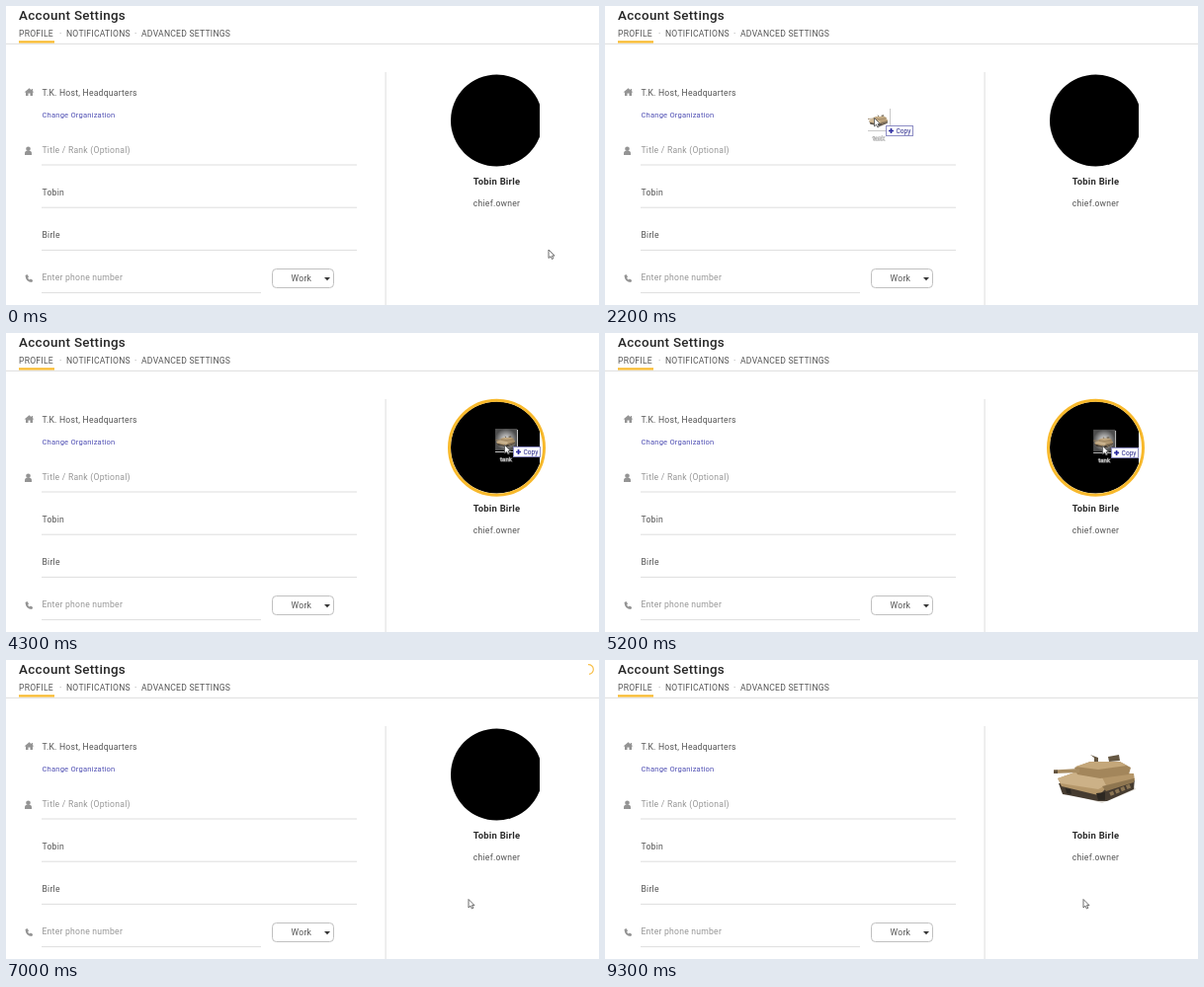
Recreate the animation shown at these times as an HTML page. Size 600 px wide and 303 px high, loop 9400 ms.

```html
<!DOCTYPE html>
<html lang="en">
<head>
<meta charset="utf-8">
<title>Account Settings</title>
<style>
  html, body { margin: 0; width: 100%; height: 100%; overflow: hidden; background: #fff; }
  svg { display: block; width: 100%; height: 100%; }
  text { font: 8.6px Roboto, sans-serif; letter-spacing: .24px; fill: #545454; }
  .title { font-size: 13.4px; font-weight: 500; letter-spacing: .33px; fill: #262626; }
  .tab { fill: #555; }
  .link { font-size: 7.6px; letter-spacing: .18px; fill: #5050b4; }
  .hint { fill: #969696; }
  .center { text-anchor: middle; }
  .name { font-size: 9.4px; font-weight: 600; fill: #2a2a2a; }
  .copy { font-size: 6.6px; letter-spacing: 0; fill: #26268a; }
  .file { font-size: 6px; letter-spacing: .08px; fill: #fff; stroke: #8a8a8a; stroke-width: 1px; paint-order: stroke; opacity: .85; }
  .icon { fill: #949494; }
  .rule { stroke: #dedede; fill: none; }
</style>
</head>
<body>
<svg viewBox="0 0 600 303">
  <defs>
    <clipPath id="photoEdge"><rect x="450" y="69" width="90" height="94"/></clipPath>
    <radialGradient id="thumb">
      <stop offset=".3" stop-color="#fff" stop-opacity=".75"/>
      <stop offset="1" stop-color="#fff" stop-opacity=".3"/>
    </radialGradient>
    <g id="tank">
      <path d="M8 38L50 50 84 36 80 31 20 29Z" fill="#ddd9d2"/>
      <path d="M6 30L10 41 16 42 46 48 55 48 82 36 83 25 50 30Z" fill="#453b30"/>
      <path d="M5 25L22 19 82 20 83 27 54 35 50 39 46 42 9 33Z" fill="#b5976a"/>
      <path d="M5 25L22 19 50 24 54 32 46 36 8 30Z" fill="#ccb187"/>
      <path d="M50 33L82 25 82 29 54 38Z" fill="#8f7650"/>
      <path d="M22 14L38 8 68 8 79 14 77 21 48 25 25 21Z" fill="#a3865b"/>
      <path d="M23 13L38 8 68 8 75 12 46 16Z" fill="#c4a77a"/>
      <path d="M1 16.5L27 15 27 19 1 20Z" fill="#a88d63"/>
      <path d="M1 16.5H5V20H1Z" fill="#62533f"/>
      <path d="M38 1L46 4 46 8 42 8 42 4ZM56 3L67 1 68 7 57 8Z" fill="#655742"/>
      <path d="M13 35L18 36 19 41 14 40ZM44 40L53 39 53 47 46 47Z" fill="#2d2822"/>
      <path d="M58 41L80 32" stroke="#8b7553" stroke-width="4" stroke-dasharray="4 2" fill="none"/>
    </g>
  </defs>
  <rect width="600" height="303" fill="#fff"/>

  <text class="title" x="13" y="14">Account Settings</text>
  <text class="tab" x="13" y="30.5">PROFILE</text>
  <text class="tab hint" x="54" y="30.5">·</text>
  <text class="tab" x="61" y="30.5">NOTIFICATIONS</text>
  <text class="tab hint" x="130" y="30.5">·</text>
  <text class="tab" x="137" y="30.5">ADVANCED SETTINGS</text>
  <path class="rule" d="M0 38.4H600"/>
  <rect x="13" y="35.3" width="36" height="2.2" fill="#f8b92c"/>

  <path class="icon" d="M23.5 83.2L25.8 85.2V84H27V86.3L28.5 87.6H27V91H24.5V88.5H22.5V91H20V87.6H18.5Z"/>
  <path class="icon" d="M19 151V149.5Q19 146.8 21.3 146.8H23.7Q26 146.8 26 149.5V151Z"/>
  <circle class="icon" cx="22.5" cy="144.7" r="2.3"/>
  <path class="icon" d="M19.5 273L21.5 272 23 274.5 22 275.8 23.8 277.6 25 276.5 27.2 278 26.2 280Q20 280 19.5 273Z"/>

  <text x="36.5" y="90.5">T.K. Host, Headquarters</text>
  <text class="link" x="36.5" y="113.2">Change Organization</text>
  <text class="hint" x="36.5" y="149">Title / Rank (Optional)</text>
  <text x="36.5" y="192">Tobin</text>
  <text x="36.5" y="235">Birle</text>
  <text class="hint" x="36.5" y="278">Enter phone number</text>
  <path class="rule" d="M36 161H355M36 204.2H355M36 247.4H355M36 290.6H258M384.1 67V303"/>
  <rect x="269.5" y="266.5" width="62" height="19" rx="4" fill="#fff" stroke="#c0c0c0"/>
  <text x="288.5" y="279">Work</text>
  <path d="M322 275H328L325 278.2Z" fill="#333"/>

  <circle id="badge" cx="496.5" cy="116" r="46.5" clip-path="url(#photoEdge)"/>
  <circle id="ring" cx="496.5" cy="116.2" r="48" fill="none" stroke="#f8b92c" stroke-width="3"/>
  <g id="upload">
    <circle cx="496.5" cy="116" r="46.5" fill="#1e1e1e"/>
    <rect id="bar" x="456.5" y="113.5" width="80" height="5.5" rx="1.5" fill="#f8b92c"/>
  </g>
  <use id="photo" href="#tank" x="453" y="95"/>
  <text class="name center" x="496.5" y="180.8">Tobin Birle</text>
  <text class="center" x="496.5" y="203">chief.owner</text>

  <path id="spinner" d="M-1.5 -4.8A4.8 4.8 0 0 1 -.5 4.8" fill="none" stroke="#f8c04a" stroke-width="1.2"/>

  <g id="ghost">
    <rect x="-18" y="-18" width="22" height="22" fill="url(#thumb)"/>
    <path d="M4.5 -17V3M-18 5.5H1" stroke="#c9c9c9" fill="none"/>
    <use href="#tank" transform="translate(-18 -11) scale(.24)" opacity=".85"/>
    <text class="file center" x="-7" y="15">tank</text>
  </g>
  <path id="cursor" d="M.5 .5V9L2.5 7.2 3.9 10 5.3 9.3 4 6.6H6.5Z" fill="#fff" stroke="#5c5c5c" stroke-width=".9"/>
  <g id="tip">
    <rect x=".5" y=".5" width="27" height="10" fill="#fff" stroke="#8c8cc4"/>
    <path d="M3 5.5H8M5.5 3V8" stroke="#2b2ba0" stroke-width="1.7"/>
    <text class="copy" x="10.5" y="8">Copy</text>
  </g>
</svg>
<script>
const LOOP = 9400, DRAG = [1100, 5300];
const $ = id => document.getElementById(id);

// Tracks: [time, x, y]
const dragPath = [
  [1100, 555, 58], [1400, 438, 80], [1700, 345, 116], [2000, 300, 126], [2200, 284, 121],
  [2600, 252, 109], [3000, 233, 103], [3400, 233, 103], [3700, 290, 105], [4000, 440, 110],
  [4300, 513, 115], [5300, 512, 116]
];
const grip = [[1100, -12, -8], [2200, -12, -8], [3300, -6, -8], [4300, -9, -2], [5300, -9, -2]];
const freePath = [
  [5300, 503, 114], [5500, 490, 122], [5900, 396.5, 166], [6300, 396.5, 166],
  [6900, 467.5, 242], [7300, 467.5, 242], [7800, 483.5, 242]
];

const mix = (a, b, k) => a + (b - a) * k;
const within = (t, from, to) => t >= from && t < to;

function sample(track, t) {
  const i = track.findIndex(step => step[0] > t);
  if (i === 0) return track[0].slice(1);
  if (i < 0) return track[track.length - 1].slice(1);
  const [a, b] = [track[i - 1], track[i]];
  const k = (t - a[0]) / (b[0] - a[0]);
  return [mix(a[1], b[1], k), mix(a[2], b[2], k)];
}

function show(id, on) {
  $(id).style.display = on ? '' : 'none';
}

function place(id, [x, y], turn = 0) {
  $(id).setAttribute('transform', `translate(${x} ${y}) rotate(${turn})`);
}

function cursorAt(t) {
  if (t < 300) return [548.5, 246.5];
  if (t < 500) return [592.5, 226];
  if (t < DRAG[0]) return null;
  if (t >= DRAG[1]) return sample(freePath, t);
  const [x, y] = sample(dragPath, t), [dx, dy] = sample(grip, t);
  return [x + dx, y + dy];
}

function draw(now) {
  const t = Math.floor(now % LOOP / 100) * 100;
  const dragging = within(t, ...DRAG);
  const cursor = cursorAt(t);

  show('cursor', cursor);
  if (cursor) place('cursor', cursor);

  for (const id of ['ghost', 'tip']) {
    show(id, dragging);
    if (dragging) place(id, sample(dragPath, t));
  }

  show('ring', within(t, 4200, DRAG[1]));
  show('upload', within(t, 5400, 6300));
  $('bar').setAttribute('width', 80 * Math.min(1, Math.max(0, (t - 5300) / 600)));

  show('spinner', within(t, 6300, 7400));
  place('spinner', [590.5, 9.5], (t - 7000) / 400 * 360);

  show('badge', t < 7500);
  show('photo', t >= 7500);
}

const start = performance.now();
function tick() {
  draw(performance.now() - start);
  requestAnimationFrame(tick);
}
tick();
</script>
</body>
</html>
```
